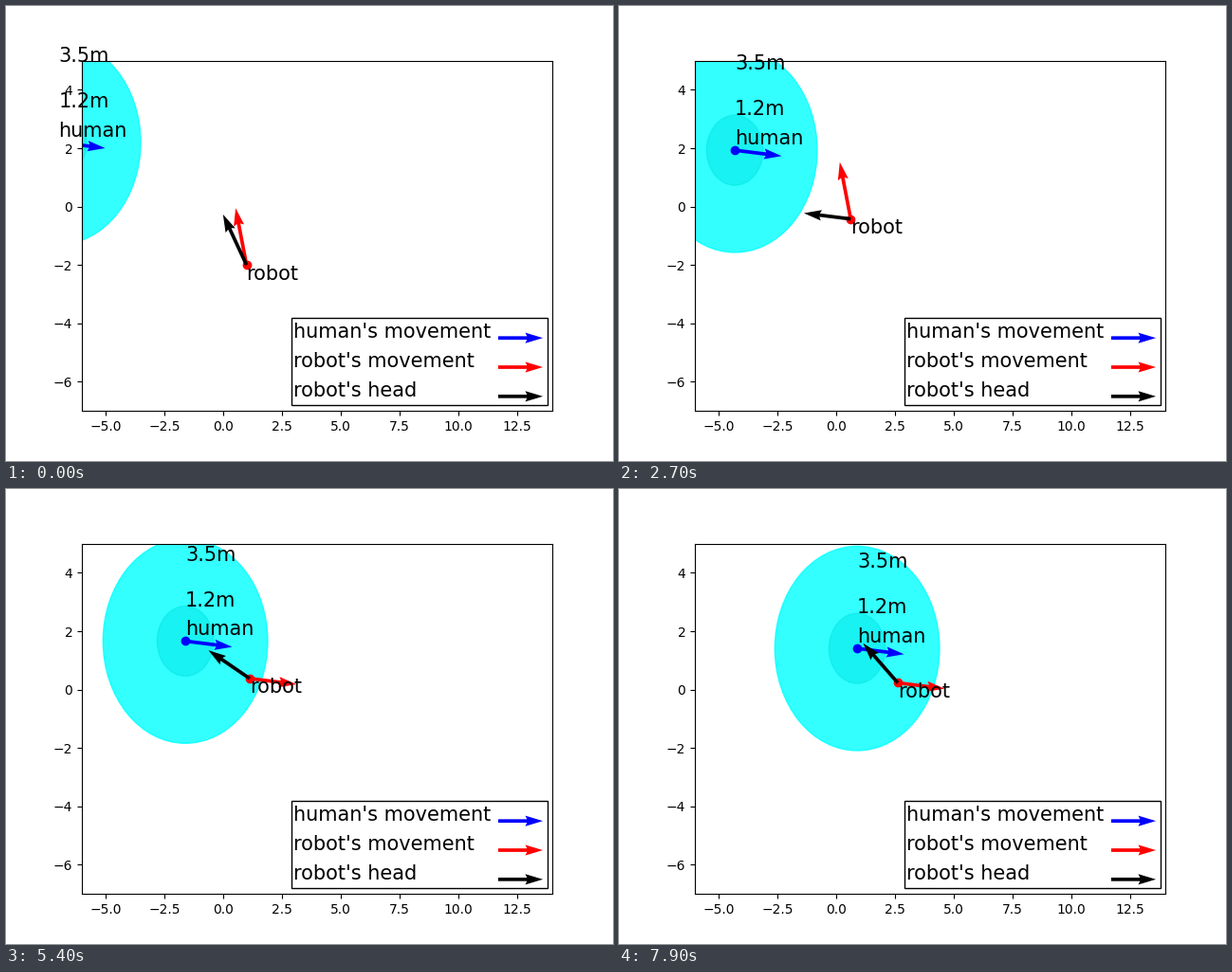
Write a matplotlib script that moves like this. It is 640x480 px and loops after 8 s.

```python
import numpy as np
import matplotlib.pyplot as plt
from matplotlib.animation import FuncAnimation
from matplotlib.patches import Circle, Rectangle

FRAMES = 80
MEET = 42                     # robot enters the 3.5 m zone here
SPEED = 0.06                  # robot metres per step
TURN = 0.05                   # head radians per step
REACH = 2.0                   # arrow length


def unit(x, y):
    v = np.array([x, y], float)
    return v / np.hypot(*v)


HUMAN_DIR = unit(1, -0.1)
ROBOT_DIR = unit(-1, 4.2)


def human_at(n):
    return np.array([-7 + 0.1 * n, 2.2 - 0.01 * n])


def robot_at(n):
    before, after = min(n, MEET), max(n - MEET, 0)
    return np.array([1.0, -2.0]) + SPEED * (before * ROBOT_DIR + after * HUMAN_DIR)


def gaze_goal(n):
    """Face against the human's course, then look just ahead of the human."""
    if n < MEET:
        dx, dy = -HUMAN_DIR
    else:
        dx, dy = human_at(n) + 0.5 * np.array([1, -0.1]) - robot_at(n)
    return np.arctan2(dy, dx)


def head_angles():
    angles = [np.radians(120)]
    for n in range(1, FRAMES):
        step = gaze_goal(n) - angles[-1]
        angles.append(angles[-1] + np.clip(step, -TURN, TURN))
    return angles


HEAD = head_angles()

fig, ax = plt.subplots(figsize=(6.4, 4.8), dpi=100)
ax.set_xlim(-6, 14)
ax.set_ylim(-7, 5)


def arrow(x, y, u, v, color):
    return ax.quiver([x], [y], [u], [v], color=color,
                     angles="xy", scale_units="xy", scale=1)


def label(x, y, s):
    return ax.text(x, y, s, fontsize=15)


def dot(color):
    return ax.plot([], [], "o", color=color, zorder=1)[0]


# Legend
ax.add_patch(Rectangle((2.9, -6.8), 10.9, 3, fill=False))
for y, name, color in [(-4.5, "human's movement", "blue"),
                       (-5.5, "robot's movement", "red"),
                       (-6.5, "robot's head", "black")]:
    label(3, y, name)
    arrow(11.7, y, 1.9, 0, color)

# Moving parts
near = ax.add_patch(Circle((0, 0), 1.2, color="teal", alpha=0.5))
far = ax.add_patch(Circle((0, 0), 3.5, color="cyan", alpha=0.8))
human_dot, robot_dot = dot("blue"), dot("red")
human_arrow = arrow(0, 0, 1, 0, "blue")
robot_arrow = arrow(0, 0, 1, 0, "red")
head_arrow = arrow(0, 0, 1, 0, "black")
human_tags = [(label(0, 0, s), dy)
              for s, dy in [("human", 0.2), ("1.2m", 1.2), ("3.5m", 2.75)]]
robot_tag = label(0, 0, "robot")


def aim(q, pos, direction):
    q.set_offsets([pos])
    q.set_UVC([REACH * direction[0]], [REACH * direction[1]])


def update(n):
    human, robot = human_at(n), robot_at(n)
    for zone in (near, far):
        zone.center = tuple(human)
    human_dot.set_data([human[0]], [human[1]])
    robot_dot.set_data([robot[0]], [robot[1]])
    aim(human_arrow, human, HUMAN_DIR)
    aim(robot_arrow, robot, ROBOT_DIR if n < MEET else HUMAN_DIR)
    aim(head_arrow, robot, (np.cos(HEAD[n]), np.sin(HEAD[n])))
    for tag, dy in human_tags:
        tag.set_position((human[0], human[1] + dy))
    robot_tag.set_position((robot[0], robot[1] - 0.5))
    return []


anim = FuncAnimation(fig, update, frames=FRAMES, interval=100,
                     repeat=True, repeat_delay=0, blit=False)
plt.show()
```
